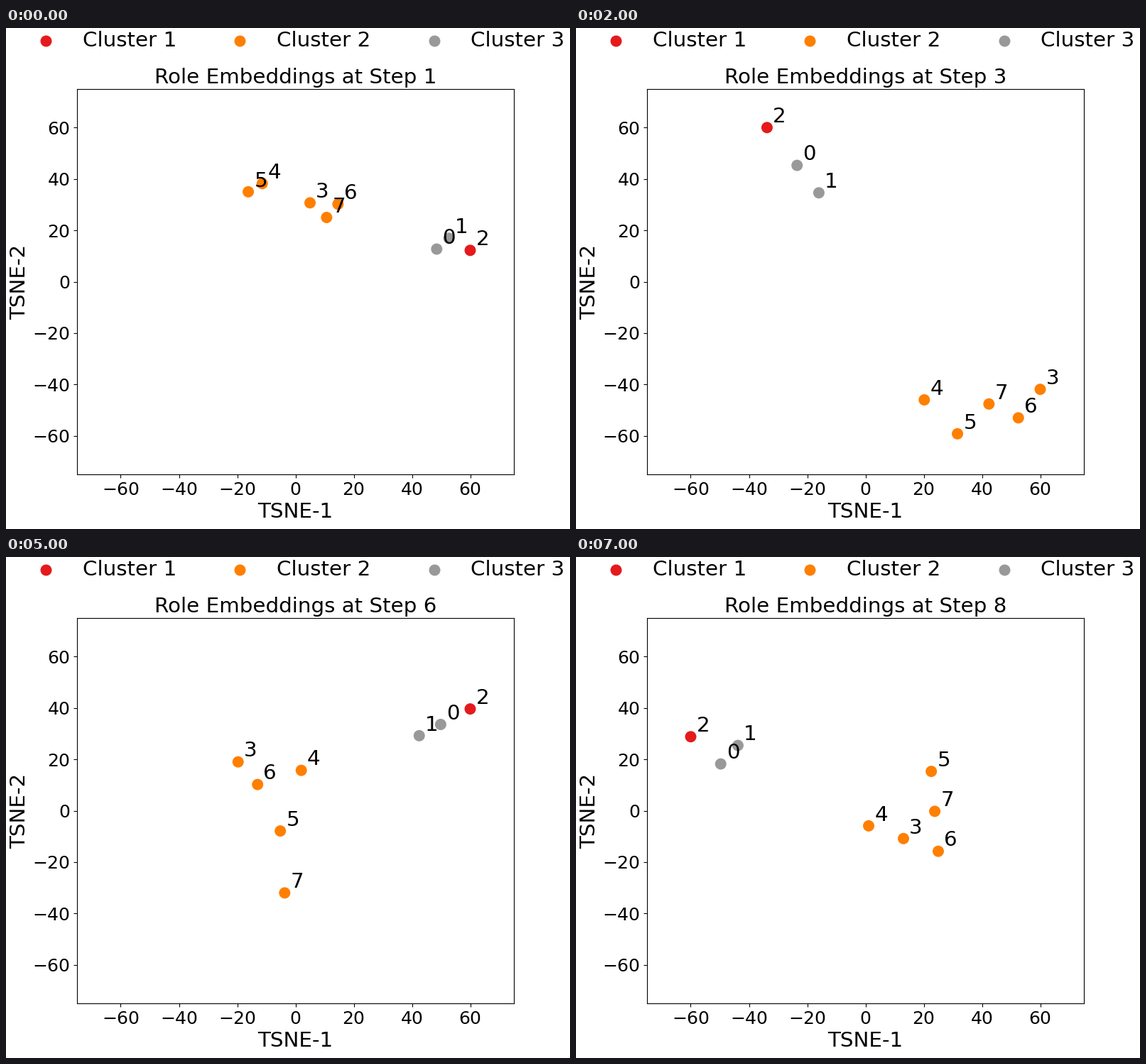
These frames come from a looping animation (794 by 706 pixels, 8 s). A matplotlib script:

```python
import matplotlib.pyplot as plt
import numpy as np
from matplotlib.animation import FuncAnimation

W, H, DPI = 794, 706, 100
TEXT, TICK, DOT = 21.2, 18, 110
RED, ORANGE, GRAY = "#e41a1c", "#ff7f00", "#999999"
ROLE_COLORS = [GRAY, GRAY, RED] + [ORANGE] * 5

# Each step: two chains of roles, each with the key points of its path
STEPS = [
    [("012", (48.5, 12.7), (52.7, 16.9), (60, 12.2)),
     ("54376", (-16.2, 35), (-11.4, 38.2), (5, 30.7), (10.7, 25), (14.6, 30.2))],
    [("012", (24, -44), (30, -60)),
     ("43576", (-9, 14), (19, 30))],
    [("102", (-16, 34.6), (-33.8, 60)),
     ("45763", (20.2, -46), (31.6, -59.2), (42.4, -47.6), (52.5, -53), (60, -41.9))],
    [("102", (-29, 39), (-44.6, 60)),
     ("43576", (8, -14), (34, -31))],
    [("012", (-35.8, -43.9), (-54.6, -60)),
     ("63547", (0.4, 38), (22.9, -5.3))],
    [("102", (42.5, 29.2), (60, 39.6)),
     ("36457", (-19.7, 19), (-13, 10.2), (2, 15.7), (-5.2, -7.9), (-3.7, -32))],
    [("102", (47.7, 15.2), (51.2, 26.2), (60, 28.5)),
     ("67345", (-17.7, -5.6), (-11.2, -9.1), (-12.8, -26.1), (12.8, -7.9), (7, -2.5))],
    [("102", (-43.8, 25.4), (-49.7, 18.2), (-60, 28.8)),
     ("43675", (1.1, -5.9), (25, -15.8), (22.6, 15.3))],
]


def spread(roles, *keys):
    """Space the roles along the path through the keys."""
    t = np.linspace(0, 1, len(roles))
    if len(keys) == 2:
        t = t ** 1.25  # straight chains open up towards their end
    knots = np.linspace(0, 1, len(keys))
    xs, ys = zip(*keys)
    return np.column_stack([np.interp(t, knots, xs), np.interp(t, knots, ys)])


def place(step):
    points = np.zeros((len(ROLE_COLORS), 2))
    for roles, *keys in STEPS[step]:
        points[[int(r) for r in roles]] = spread(roles, *keys)
    return points


plt.rcParams["font.family"] = "DejaVu Sans"
fig = plt.figure(figsize=(W / DPI, H / DPI), dpi=DPI, facecolor="white")

# Legend row, laid out in pixels
top = fig.add_axes([0, 0, 1, 1])
top.set(xlim=(0, W), ylim=(H, 0))
top.axis("off")
for i, color in enumerate([RED, ORANGE, GRAY]):
    x = 56 + 273.25 * i
    top.scatter(x, 18.3, s=DOT, color=color)
    top.text(x + 51.8, 26, f"Cluster {i + 1}", fontsize=TEXT)

ticks = range(-60, 61, 20)
ax = fig.add_axes([100 / W, 77 / H, 615 / W, 543 / H])
ax.set(xlim=(-75, 75), ylim=(-75, 75), xticks=ticks, yticks=ticks)
ax.tick_params(labelsize=TICK)
ax.set_xlabel("TSNE-1", fontsize=TEXT)
ax.set_ylabel("TSNE-2", fontsize=TEXT, labelpad=3)
title = ax.set_title("", fontsize=TEXT, y=1, pad=6)

dots = ax.scatter(*place(0).T, s=DOT, c=ROLE_COLORS)
labels = [ax.text(0, 0, str(i), fontsize=TEXT) for i in range(len(ROLE_COLORS))]


def update(step):
    points = place(step)
    title.set_text(f"Role Embeddings at Step {step + 1}")
    dots.set_offsets(points)
    for label, point in zip(labels, points):
        label.set_position(point + 2)
    return [title, dots, *labels]


anim = FuncAnimation(fig, update, frames=len(STEPS), interval=1000,
                     init_func=lambda: update(0), repeat=True, repeat_delay=0)
plt.show()
```
